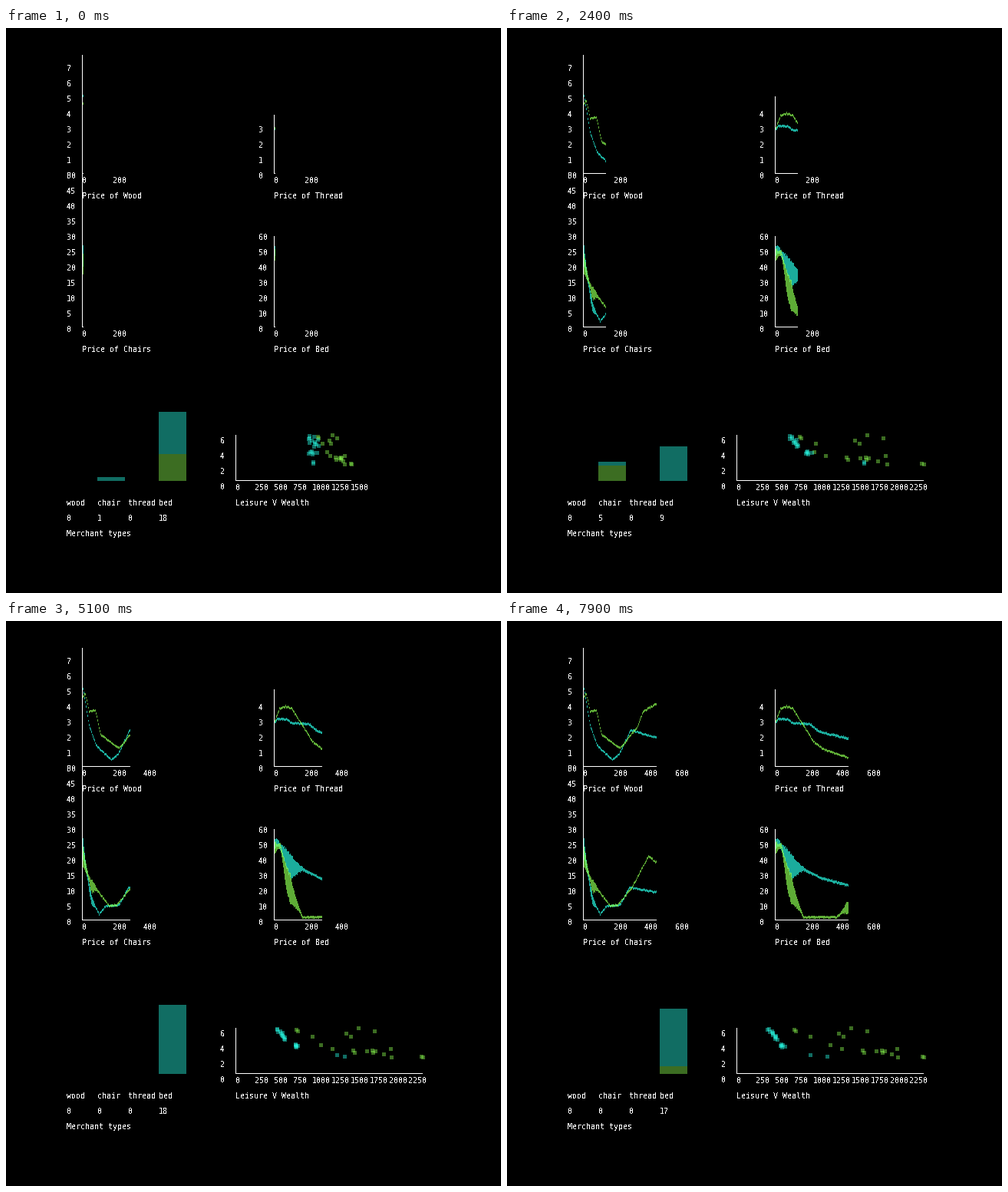
A matplotlib script that plays this animation: 645x736 px, repeating every 8 s.

```python
import numpy as np
import matplotlib.pyplot as plt
from matplotlib.animation import FuncAnimation

W, H, DPI = 645, 736, 100
FRAMES, STEP = 80, 100
PX_PER_FRAME = 1.2
LAST = FRAMES - 1

TEAL = np.array([40, 255, 232])
GREEN = np.array([140, 255, 80])
WHITE = np.array([255, 255, 255])
SOFT, STRONG = 0.43, 0.675

plt.rcParams["text.antialiased"] = False
fig = plt.figure(figsize=(W / DPI, H / DPI), dpi=DPI, facecolor="black")
ax = fig.add_axes([0, 0, 1, 1])
ax.set_axis_off()


def label(x, y, s):
    """Left-aligned text whose middle sits at y."""
    return ax.text(x, y + 4, s, color="white", fontsize=10 * 72 / DPI,
                   family="DejaVu Sans Mono", ha="left", va="baseline")


def paint(img, x0, y0, x1, y1, color, alpha=1.0):
    """Blend a box onto the picture."""
    x0, y0, x1, y1 = (int(round(v)) for v in (x0, y0, x1, y1))
    box = img[y0:y1, x0:x1]
    box += (color - box) * alpha


class Trace:
    """A jittery price line through a few points; bursts widen it.

    Each burst is (centre, size, spread) along the time axis.
    """

    def __init__(self, color, points, bursts=(), half=1.4, seed=0):
        rng = np.random.default_rng(seed)
        t = np.arange(100)
        mid = np.interp(t, *zip(*points)) + rng.uniform(-0.8, 0.8, t.size)
        wide = sum(a * np.exp(-((t - c) / w) ** 2) for c, a, w in bursts)
        wide = half + wide * rng.uniform(0.75, 1.1, t.size)
        self.color, self.lo, self.hi = color, mid - wide, mid + wide

    def draw(self, img, x, width):
        for c in range(1, width):
            paint(img, x + c, self.lo[c], x + c + 1, self.hi[c], self.color, STRONG)


wood = [
    Trace(TEAL, [(0, 82), (9, 136), (18, 162), (38, 181), (47, 173), (62, 142),
                 (94, 152)], seed=1),
    Trace(GREEN, [(0, 100), (4, 95), (9, 118), (17, 116), (24, 148), (48, 166),
                  (70, 139), (78, 118), (94, 109)], seed=2),
]
thread = [
    Trace(TEAL, [(0, 133), (4, 128), (17, 128), (22, 133), (45, 134), (57, 144),
                 (94, 153)], half=1.6, seed=3),
    Trace(GREEN, [(0, 133), (7, 114), (15, 111), (23, 114), (50, 157), (63, 167),
                  (94, 178)], seed=4),
]
chairs = [
    Trace(TEAL, [(0, 290), (5, 324), (12, 363), (22, 382), (30, 372), (48, 370),
                 (60, 347), (94, 353)], [(0, 13, 4), (11, 6, 4)], seed=5),
    Trace(GREEN, [(0, 304), (11, 344), (18, 349), (35, 371), (45, 370), (63, 348),
                  (85, 306), (94, 314)], [(0, 14, 5), (13, 7, 4)], seed=6),
]
bed = [
    Trace(TEAL, [(0, 290), (5, 289), (14, 305), (22, 321), (36, 323), (60, 335),
                 (94, 344)], [(0, 5, 5), (21, 14, 10)], half=1.7, seed=7),
    Trace(GREEN, [(0, 295), (8, 293), (16, 335), (24, 358), (37, 386), (80, 386),
                  (94, 373)], [(0, 7, 4), (20, 18, 8), (95, 7, 5)], half=1.7, seed=8),
]
# left, axis top, axis bottom, traces
charts = [(99, 35, 189, wood), (349, 89, 189, thread),
          (99, 190, 389, chairs), (349, 271, 389, bed)]


def drifters():
    """Slowly spending people: the idle ones (top) get poor first."""
    rng = np.random.default_rng(11)
    for y in np.r_[np.linspace(531, 545, 12), np.linspace(551, 555, 6)]:
        start = rng.uniform(393, 407)
        end = 340 + 0.8 * (y - 530) + rng.uniform(-3, 3)
        yield y, start, end, 0.6 if y < 548 else 1.5


TEAL_PEOPLE = list(drifters())
TEAL_EARNERS = [(565, 395), (567, 417)]
# leisure height, final wealth position
GREEN_PEOPLE = [
    (532, 374), (534, 376), (541, 395), (552, 421), (537, 432), (541, 438), (530, 448),
    (534, 469), (557, 508), (559, 463), (562, 465), (560, 481), (559, 488), (562, 489),
    (560, 492), (564, 501), (568, 509), (567, 541), (568, 543), (557, 436),
]


def people(n):
    """Place of everyone on the wealth chart, as (x, y, color)."""
    t = n / LAST
    rise = np.interp(n, [0, 9, 14], [0, 1.08, 1])
    for y, end in GREEN_PEOPLE:
        start = 405 + 0.26 * (end - 370)
        drift = 30 * np.clip((543 - end) / 50, 0, 1) * (1 - t)
        if end < 400:
            drift /= 3
        goal = end + (drift if y < 545 else -drift)
        yield start + rise * (goal - start), y, GREEN
    for y, start, end, bend in TEAL_PEOPLE:
        yield start + (end - start) * t ** bend, y, TEAL
    for y, end in TEAL_EARNERS:
        yield np.interp(n, [0, 14, 24, LAST], [400, 460, 465, end]), y, TEAL


# Merchant counts at a few key times
COUNT_KEYS = [0, 14, 24, 33, 42, 61, LAST]
CHAIR = {"green": [0, 7, 4, 2, 0, 0, 0], "teal": [1, 0, 1, 2, 0, 0, 0]}
BED = {"green": [7, 0, 0, 0, 0, 0, 2], "teal": [11, 12, 9, 12, 19, 17, 15]}


def draw_bar(img, x, series, n):
    green, teal = (int(round(np.interp(n, COUNT_KEYS, series[k])))
                   for k in ("green", "teal"))
    mid = 590 - 5 * green
    paint(img, x, mid, x + 36, 590, GREEN, SOFT)
    paint(img, x, mid - 5 * teal, x + 36, mid, TEAL, SOFT)
    return str(green + teal)


# Fixed text
for x, base, top, step in [(79, 192, 7, 1), (329, 192, 3, 1),
                           (79, 392, 50, 5), (329, 392, 60, 10), (279, 597, 6, 2)]:
    for i, v in enumerate(range(0, top + 1, step)):
        label(x, base - 20 * i, str(v))
for x, y, s in [(99, 218, "Price of Wood"), (349, 218, "Price of Thread"),
                (99, 418, "Price of Chairs"), (349, 418, "Price of Bed"),
                (299, 618, "Leisure V Wealth"), (79, 658, "Merchant types"),
                (79, 638, "0"), (159, 638, "0")]:
    label(x, y, s)
for i, name in enumerate(["wood", "chair", "thread", "bed"]):
    label(79 + 40 * i, 618, name)

# Text that changes
thread_four = label(329, 112, "4")
ticks = [(v, label(x + v // 5, y, str(v)))
         for x in (99, 349) for y in (198, 398) for v in (0, 200, 400, 600)]
wealth_ticks = [(v, label(299 + v // 10, 598, str(v))) for v in range(0, 2501, 250)]
chair_text = label(119, 638, "")
bed_text = label(199, 638, "")

view = ax.imshow(np.zeros((H, W, 3), np.uint8), extent=(0, W, H, 0),
                 interpolation="nearest", aspect="auto")


def draw(n):
    img = np.zeros((H, W, 3))
    width = int(PX_PER_FRAME * n) + 2
    samples = 6 * n + 2

    for x, top, bottom, traces in charts:
        if traces is thread:
            top = np.interp(n, [0, 4], [113, top])
            thread_four.set_visible(top <= 109)
        for trace in traces:
            trace.draw(img, x, width)
        paint(img, x, top, x + 1, bottom + 1, WHITE)
        paint(img, x, bottom, x + width, bottom + 1, WHITE)
    for v, text in ticks:
        text.set_visible(v <= 200 * (samples // 200 + 1))

    chair_text.set_text(draw_bar(img, 119, CHAIR, n))
    bed_text.set_text(draw_bar(img, 199, BED, n))

    richest = 0
    for x, y, color in people(n):
        left, top = round(x) - 2, round(y) - 2
        paint(img, left, top, left + 5, top + 5, color, SOFT)
        richest = max(richest, x)
    paint(img, 299, 530, 300, 590, WHITE)
    paint(img, 299, 589, richest, 590, WHITE)
    for v, text in wealth_ticks:
        text.set_visible(299 + v / 10 <= richest)

    view.set_data(np.clip(img, 0, 255).astype(np.uint8))
    return [view]


anim = FuncAnimation(fig, draw, frames=FRAMES, interval=STEP, repeat=True,
                     repeat_delay=0, blit=False)
plt.show()
```
